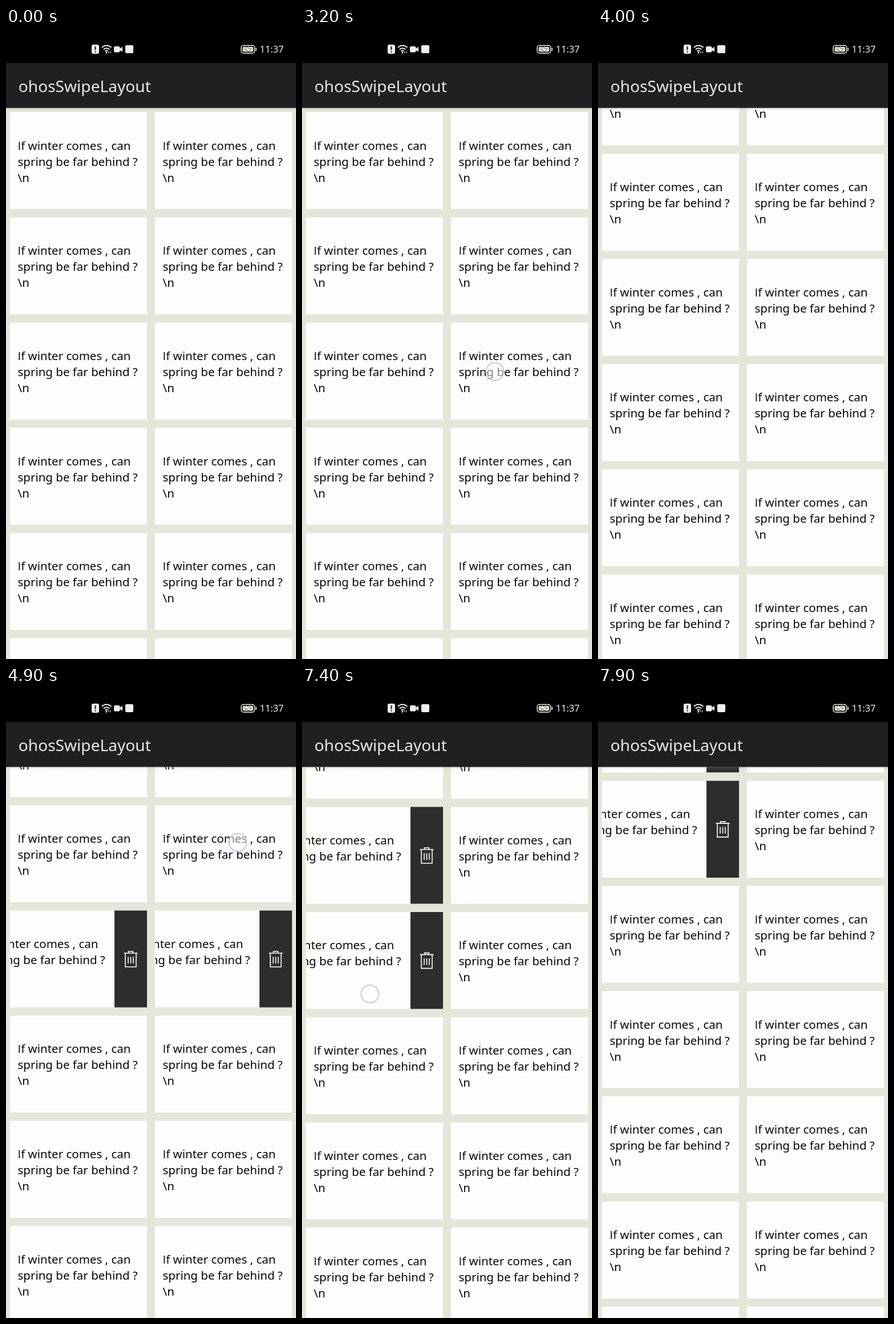
These frames come from a looping animation (508 px wide and 1102 px high, 8000 ms). An HTML page:

```html
<!DOCTYPE html>
<html lang="en">
<head>
<meta charset="utf-8">
<title>Swipe layout grid</title>
<style>
html, body { margin: 0; width: 100%; height: 100%; overflow: hidden; background: #000; }
body > svg { display: block; width: 508px; height: 1102px; }
text { font-family: "Noto Sans", "Open Sans", sans-serif; }
.card text { font-size: 20.5px; fill: #080808; }
.plain { font-family: "Open Sans", sans-serif; }
</style>
</head>
<body>
<svg viewBox="0 0 508 1102">
  <defs>
    <linearGradient id="shade" x2="0" y2="1">
      <stop stop-color="#777" stop-opacity=".6"/>
      <stop offset=".35" stop-color="#999" stop-opacity=".15"/>
      <stop offset="1" stop-color="#999" stop-opacity="0"/>
    </linearGradient>
    <path id="trash" fill="none" stroke="#fff" stroke-width="1.6"
      d="M-12 -10.500H12M-4 -10.500V-13.500H4V-10.500M-9.500 -10V13.500H9.500V-10M-4.500 -4V7.500M0 -4V7.500M4.500 -4V7.500"/>
  </defs>
  <rect width="508" height="1102" fill="#e4e6da"/>
  <g id="grid"></g>
  <rect y="139" width="508" height="6" fill="url(#shade)"/>
  <circle id="touch" r="15.5" fill="#fff" fill-opacity=".5" stroke="#c5cae5" stroke-width="2"/>
  <rect width="508" height="61" fill="#000"/>
  <rect y="61" width="508" height="78.5" fill="#202022"/>
  <text x="21.8" y="112" font-size="28.1" font-weight="500" textLength="" fill="#e8e8e8">ohosSwipeLayout</text>

  <g fill="#eee">
    <rect x="150" y="29" width="13" height="16" rx="3"/>
    <path d="M156.500 32V38.500M156.500 40.500V42.500" stroke="#111" stroke-width="2"/>
    <path d="M168 34Q176 27 184.500 34M171 37.500Q176 33 181.500 37.500M173.500 40.500Q176 38.500 178.500 40.500"
      fill="none" stroke="#eee" stroke-width="2"/>
    <circle cx="176" cy="43" r="1.6"/>
    <path d="M180 40.500V44M183 40.500V44" stroke="#ccc" stroke-width="1.2"/>
    <rect x="189" y="32" width="10.5" height="10.5" rx="2.5"/>
    <path d="M199 36L204 33V41.500L199 38.500Z"/>
    <rect x="209" y="30" width="14" height="14" rx="2"/>
    <rect x="412" y="30.5" width="23.5" height="13.5" rx="4" fill="none" stroke="#eee" stroke-width="1.5"/>
    <rect x="414.5" y="33" width="18.5" height="8.5" rx="2" fill="#d5e2cb"/>
    <path d="M425.500 32L418 38H423.500L422 42.500L430 36.500H424.500Z" fill="#fff" stroke="#555" stroke-width=".7"/>
    <path d="M438 34.500V40" stroke="#ddd" stroke-width="1.8"/>
    <text x="444.5" y="43" font-size="16.4" font-weight="500">11:37</text>
  </g>
</svg>
<script>
const LOOP = 8000, STEP = 100, ROWS = 9;
const LEFT = 7, TOP = 147, COLUMN = 254, PITCH = 183.7;
const WIDTH = 240, HEIGHT = 169.5, PANEL = 57;
const SWIPE_MS = 300;

// Each swipe toggles its card: open, then closed again.
const swipes = [
  [800, 0, 0], [1500, 0, 1], [2200, 0, 1], [2800, 0, 0],
  [4100, 2, 0], [4500, 2, 1], [4900, 1, 1], [5200, 1, 0],
  [6400, 2, 1], [6900, 1, 1]
].map(([at, row, col]) => ({ at, row, col }));

const scrolls = [
  { at: 3200, ms: 300, by: 41, x: 338, y: 600 },
  { at: 3700, ms: 400, by: 83.2, x: 338, y: 600 },
  { at: 5500, ms: 400, by: -6, x: 338, y: 488 },
  { at: 5900, ms: 400, by: 3.3, x: 338, y: 494 },
  { at: 7400, ms: 500, by: 229.3, x: 119, y: 536 }
];

const grid = document.getElementById("grid");
const touch = document.getElementById("touch");

const clamp = k => Math.min(1, Math.max(0, k));
const ease = k => k * k * (3 - 2 * k);
const progress = (t, at, ms) => ease(clamp((t - at) / ms));
const cardX = col => LEFT + col * COLUMN;
const cardY = row => TOP + row * PITCH;
const scrollAt = t => scrolls.reduce((sum, s) => sum + s.by * progress(t, s.at, s.ms), 0);

function openness(t, row, col) {
  return swipes.filter(s => s.row === row && s.col === col)
    .reduce((open, s, i) => open + (i % 2 ? -1 : 1) * progress(t, s.at, SWIPE_MS), 0);
}

const cardMarkup = (row, col) => `
  <svg class="card" x="${cardX(col)}" y="${cardY(row)}" width="${WIDTH}" height="${HEIGHT}">
    <rect width="${WIDTH}" height="${HEIGHT}" fill="#fdfdfd"/>
    <g>
      <text x="13.5" y="65.5"><tspan class="plain">I</tspan>f winter comes , can</text>
      <text x="13.5" y="93.5">spring be far behind ?</text>
      <text x="13.5" y="121.5">\\n</text>
      <g transform="translate(${WIDTH})">
        <rect width="${PANEL}" height="${HEIGHT}" fill="#2d2d2d"/>
        <use href="#trash" x="${PANEL / 2}" y="85"/>
      </g>
    </g>
  </svg>`;

const cells = Array.from({ length: ROWS * 2 }, (_, i) => ({ row: i >> 1, col: i % 2 }));
grid.innerHTML = cells.map(c => cardMarkup(c.row, c.col)).join("");
const surfaces = grid.querySelectorAll(".card > g");

// The finger stays down for the first half of a gesture.
function fingerAt(t) {
  const held = (at, ms) => t >= at && t <= at + ms / 2;
  const scroll = scrolls.find(s => held(s.at, s.ms));
  if (scroll) return [scroll.x, scroll.y - scrollAt(t) + scrollAt(scroll.at)];

  const swipe = swipes.find(s => held(s.at, SWIPE_MS));
  if (!swipe) return null;
  const { at, row, col } = swipe;
  const openTarget = openness(at + SWIPE_MS, row, col) > 0.5;
  const travel = 140 * (t - at) / SWIPE_MS;
  return [cardX(col) + (openTarget ? 145 - travel : 75 + travel), cardY(row) + 65 - scrollAt(t)];
}

function draw(t) {
  grid.setAttribute("transform", `translate(0 ${-scrollAt(t)})`);
  cells.forEach(({ row, col }, i) =>
    surfaces[i].setAttribute("transform", `translate(${-PANEL * openness(t, row, col)})`));

  const finger = fingerAt(t);
  touch.setAttribute("visibility", finger ? "visible" : "hidden");
  if (finger) touch.setAttribute("transform", `translate(${finger})`);
}

const origin = performance.now();
function tick() {
  const t = (performance.now() - origin) % LOOP;
  draw(Math.floor(t / STEP) * STEP);
  requestAnimationFrame(tick);
}
tick();
</script>
</body>
</html>
```
